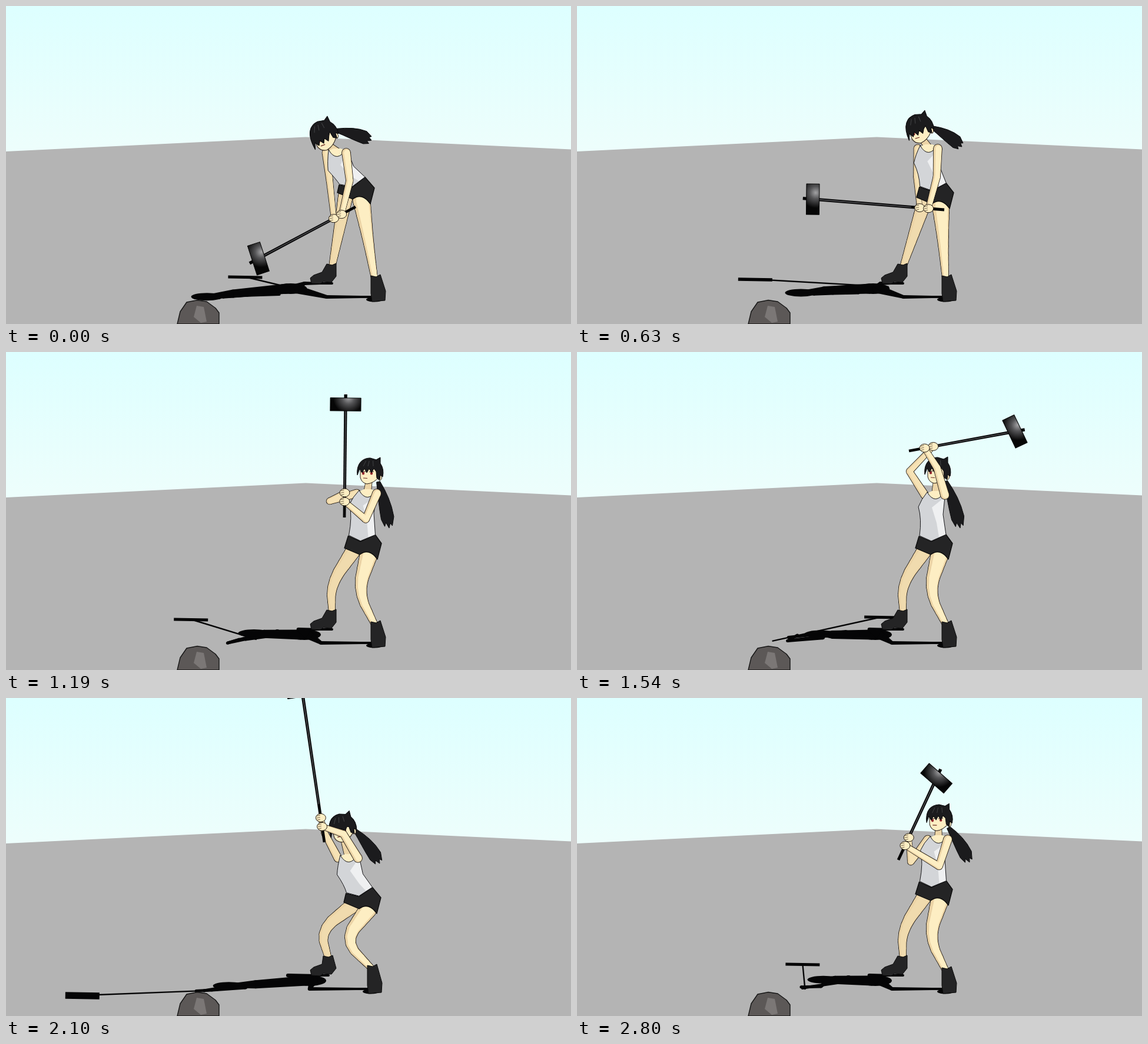
An HTML page with a canvas for the animation above (2.87 s loop, 960 by 540 pixels).

```html
<!DOCTYPE html>
<html lang="en">
<head>
<meta charset="utf-8">
<title>Hammer swing</title>
<style>
html, body { margin: 0; width: 100%; height: 100%; overflow: hidden; background: #b4b4b4; }
canvas { display: block; width: 960px; height: 540px; }
</style>
</head>
<body>
<canvas id="stage" width="960" height="540"></canvas>
<script>
const c = document.getElementById('stage').getContext('2d');
const LOOP = 2870, STEP = 70;
const SKIN = '#fdeec3', SHADE = '#ecd4a6', HAIR = '#1b1b1d', CLOTH = '#242425', BLACK = '#050506';

const smooth = u => u * u * (3 - 2 * u);
const strike = u => u < 2 / 3 ? 1.13 * (u * 1.5) ** 1.3 : 1.13 - 0.13 * smooth(u * 3 - 2);

// arms: upper-arm angles, near and far. hammer: angle, length, skew, depth of its shadow.
const ready = {
  t: 1190, ease: u => 1 - (1 - u) ** 2, hip: [609, 330], neck: [614, 235], head: [619, 203],
  tail: [651, 299], arms: [113, 164], butt: [575, 281], hammer: [-89.4, 192, 0, 454]
};
const poses = [
  { t: 0, ease: u => u * u, hip: [597, 314], neck: [562, 244], head: [540, 218],
    tail: [621, 228], arms: [83, 83], butt: [594, 341], hammer: [-208, 187, 10, 460] },
  { t: 630, ease: u => u, hip: [611, 322], neck: [597, 237], head: [582, 207],
    tail: [654, 239], arms: [92, 92], butt: [624, 346], hammer: [-175.4, 224, -4, 464] },
  ready,
  { ...ready, t: 1540, ease: u => u ** 2.2, neck: [609, 238], head: [613, 202],
    arms: [254, 237], butt: [564, 168], hammer: [-10.4, 183, -15, 450] },
  { t: 2100, ease: strike, hip: [608, 344], neck: [582, 267], head: [572, 220],
    tail: [635, 281], arms: [239, 242], butt: [541, 245], hammer: [-98.4, 261, 0, 505] },
  { t: 2520, ease: smooth, hip: [612, 345], neck: [555, 318], head: [522, 302],
    tail: [606, 311], arms: [104, 127], butt: [540, 432], hammer: [-173.2, 218, 0, 546] },
  { ...ready, t: 2800, head: [616, 204], tail: [667, 279],
    arms: [108, 127], butt: [546, 275], hammer: [-65, 153, 16, 452] }
];

const rad = deg => deg * Math.PI / 180;
const lerp = (a, b, u) => a.map((v, k) => v + (b[k] - v) * u);
const add = (p, x, y) => [p[0] + x, p[1] + y];
const polar = (p, a, r) => add(p, Math.cos(a) * r, Math.sin(a) * r);
const turn = (x, y, a) => [x * Math.cos(a) - y * Math.sin(a), x * Math.sin(a) + y * Math.cos(a)];

// Knee position for two bones, bending towards the left.
function bend(a, b, l1, l2) {
  const dx = b[0] - a[0], dy = b[1] - a[1], d = Math.hypot(dx, dy);
  if (d >= l1 + l2) return lerp(a, b, l1 / (l1 + l2));
  const along = (l1 * l1 - l2 * l2 + d * d) / (2 * d);
  const out = 1.15 * Math.sqrt(l1 * l1 - along * along);
  return add(a, (dx * along - dy * out) / d, (dy * along + dx * out) / d);
}

function skeleton(ms) {
  let i = poses.length - 2;
  while (ms < poses[i].t) i--;
  const from = poses[i], to = poses[i + 1];
  const u = from.ease((ms - from.t) / (to.t - from.t));
  const s = {};
  for (const k of ['hip', 'neck', 'head', 'tail', 'arms', 'butt', 'hammer']) s[k] = lerp(from[k], to[k], u);
  const { hip, neck, head } = s, grip = rad(s.hammer[0]);
  s.lean = Math.atan2(neck[0] - hip[0], hip[1] - neck[1]);
  s.bow = Math.max(0, Math.min(10, (neck[0] - head[0] + 4) * 0.4));
  const arm = (side, angle, reach) => {
    const shoulder = add(neck, side, 5);
    return [shoulder, polar(shoulder, rad(angle), 48), polar(s.butt, grip, reach)];
  };
  s.near = arm(16, s.arms[0], 27);
  s.far = arm(-18, s.arms[1], 42);
  const sink = Math.max(0, Math.min(1, (hip[1] - 330) / 14));
  const leg = (top, ankle, l1, l2) => [top, bend(top, ankle, l1, l2), ankle];
  s.nearLeg = leg(add(hip, 7, 15), [626 - 6 * sink, 462 - 4 * sink], 63, 61);
  s.farLeg = leg(add(hip, -20, 9), [554 - 6 * sink, 443], 66, 48);
  return s;
}

function trace(points) {
  const path = new Path2D();
  points.forEach(p => path.lineTo(...p));
  path.closePath();
  return path;
}

function paint(path, fill, stroke, w = 1) {
  c.fillStyle = fill;
  c.fill(path);
  if (!stroke) return;
  c.strokeStyle = stroke;
  c.lineWidth = w;
  c.stroke(path);
}

const poly = (points, ...style) => paint(trace(points), ...style);

function oval(x, y, rx, ry, ...style) {
  const path = new Path2D();
  path.ellipse(x, y, rx, ry, 0, 0, Math.PI * 2);
  paint(path, ...style);
}

function line(points, color, w) {
  c.beginPath();
  points.forEach(p => c.lineTo(...p));
  c.strokeStyle = color;
  c.lineWidth = w;
  c.stroke();
}

// Tapered chain through points of [x, y, width].
function chain(points, fill, scale = 1, grow = 0, dx = 0) {
  points.forEach(([x, y, w], i) => {
    const r = w / 2 * scale + grow;
    oval(x + dx, y, r, r, fill);
    if (!i) return;
    const [px, py, pw] = points[i - 1], q = pw / 2 * scale + grow;
    const a = Math.atan2(y - py, x - px) + Math.PI / 2;
    poly([polar([px + dx, py], a, q), polar([x + dx, y], a, r),
      polar([x + dx, y], a, -r), polar([px + dx, py], a, -q)], fill);
  });
}

const widen = (points, widths) => points.map((p, i) => [...p, widths[i]]);

// Corner cutting.
function soften(points) {
  const cut = points.slice(1).flatMap((p, i) => [lerp(points[i], p, 0.25), lerp(points[i], p, 0.75)]);
  return [points[0], ...cut, points[points.length - 1]];
}

function limb(points, dark, light) {
  chain(points, '#191511', 1, 0.8);
  chain(points, dark);
  if (light) chain(points, light, 0.72, 0, 1.3);
}

function scene() {
  const sky = c.createLinearGradient(0, 0, 0, 240);
  sky.addColorStop(0, '#ddffff');
  sky.addColorStop(1, '#edfefc');
  c.fillStyle = sky;
  c.fillRect(0, 0, 960, 540);
  poly([[0, 247], [509, 222.5], [960, 243.5], [960, 540], [0, 540]], '#b4b4b4');
}

function rock() {
  poly([[291, 540], [296, 519], [307, 503], [325, 499.5], [341, 502], [356, 513], [362, 521], [362, 540]],
    '#5c5857', '#161616', 1.4);
  poly([[324, 509], [336, 511], [341, 536], [331, 538], [319, 528]], '#7b7776');
}

// The light comes from the right: height turns into a shift to the left.
function drawShadow(s) {
  const cast = ([x, y], ground) => [x - 0.72 * (ground - y), ground];
  const body = p => cast(p, 480 + 0.24 * (s.hip[0] - p[0]));
  const [angle, len, , depth] = s.hammer;
  const tip = cast(polar(s.butt, rad(angle), len), depth);
  line([body(s.butt), tip], BLACK, 2.4);
  line([add(tip, -29, 0), add(tip, 29, 1)], BLACK, 5 + Math.max(0, depth - 460) * 0.15);
  for (const arm of [s.near, s.far]) chain(widen(arm.map(body), [8, 5, 5]), BLACK);
  const hip = body(s.hip), neck = body(s.neck), head = body(s.head);
  chain(widen([hip, neck, head], [17, 14, 7]), BLACK);
  oval(hip[0] + 6, hip[1], 28, 9, BLACK);
  oval(...head, 27, 6.5, BLACK);
  [[s.nearLeg, 494], [s.farLeg, 471]].forEach(([[, knee, ankle], ground]) =>
    chain(widen([add(hip, 12, 0), cast(knee, ground), cast(ankle, ground), [ankle[0], ground]], [15, 6, 4, 4]), BLACK));
  oval(s.nearLeg[2][0], 498.5, 14, 4, BLACK);
}

function farBoot([x, y]) {
  poly([[x - 9, y - 5], [x, y - 3], [x + 7, y - 6], [561, 459], [553, 469], [539, 468], [534, 472],
    [519, 471], [517, 462], [523, 457], [537, 452]], CLOTH, '#0b0b0b');
}

function nearBoot([x, y]) {
  poly([[x - 6, y - 4], [x + 3, y - 2], [x + 10, y - 6], [x + 19, 484], [x + 18, 500], [x - 4, 502],
    [x - 6, 488]], CLOTH, '#0b0b0b');
}

function drawTail({ head, bow, tail }) {
  const root = polar(head, rad(52 - bow * 7), 22);
  const mid = add(lerp(root, tail, 0.5), 3, -4);
  const side = Math.atan2(tail[1] - root[1], tail[0] - root[0]) + Math.PI / 2;
  const at = (u, o) => polar(lerp(lerp(root, mid, u), lerp(mid, tail, u), u), side, o);
  const swell = u => 3 + 8 * Math.sin(u * 2);
  const steps = [0, 0.2, 0.4, 0.6, 0.8];
  poly([...steps.map(u => at(u, swell(u))), at(0.95, 7), at(0.88, 4), at(1, 0), at(0.91, -3), at(0.97, -6),
    ...steps.reverse().map(u => at(u, -swell(u)))], HAIR, '#0a0a0b');
}

function drawShorts({ hip, lean }) {
  const waist = (x, y) => add(hip, ...turn(x, y, lean / 2));
  const rear = add(hip, 22, 22), crotch = add(hip, -8, 14), hem = add(hip, 8, 2);
  const path = new Path2D();
  [waist(-28, -17), waist(-7, -8), waist(18, -20), add(hip, 29, -5), rear].forEach(p => path.lineTo(...p));
  path.quadraticCurveTo(...hem, ...crotch);
  path.lineTo(...add(hip, -34, 3));
  path.closePath();
  paint(path, CLOTH, '#0a0a0a', 1.3);
}

function drawTorso({ hip, neck, head, lean, bow }) {
  const waist = (x, y) => add(hip, ...turn(x, y, lean / 2));
  const upper = (x, y) => add(neck, ...turn(x, y, lean));
  const left = add(neck, -14, 0), right = add(neck, 17, -2);
  limb([[...add(head, bow * 0.5 - 2, 15), 10], [...add(neck, 0, 3), 12]], SHADE);
  poly([add(left, -4, 4), add(neck, -6, -2), add(neck, 6, -2), add(right, 4, 4), add(neck, 6, 20)], SKIN);
  const back = upper(13, 38), low = waist(18, -20), chest = upper(-29, 25);
  const path = new Path2D();
  path.moveTo(...left);
  path.quadraticCurveTo(...add(neck, 0, 24), ...right);
  for (const p of [back, low, waist(-7, -9), waist(-27, -18)]) path.lineTo(...p);
  path.quadraticCurveTo(...upper(-23, 46), ...chest);
  path.quadraticCurveTo(...upper(-24, 12), ...left);
  c.save();
  paint(path, '#d3d5d8');
  c.clip(path);
  poly([add(right, -3, 12), add(right, 6, 6), add(back, 4, 0), add(low, 4, 0), waist(6, -16),
    upper(2, 52), upper(-6, 26)], '#eff0f1');
  c.restore();
  c.strokeStyle = '#17171a';
  c.lineWidth = 1;
  c.stroke(path);
}

function drawHead({ head, bow }) {
  c.save();
  c.translate(...head);
  c.rotate(-0.045 * bow);
  c.scale(1 + bow * 0.01, 1 + bow * 0.005);
  const face = new Path2D('M-17-6V10Q-15 19-6 21Q6 20 15 9V-6');
  c.save();
  c.translate(0, bow * 0.4);
  paint(face, SKIN, '#2a1f18');
  for (const x of [-12, 2]) {
    oval(x, 3, 2.2, 2.6, '#94262c');
    line([[x - 4, 0.5], [x + 4, 0]], '#2a1518', 1);
  }
  line([[-12, 11], [-5, 11.5]], '#6b2b22', 1.2);
  c.restore();
  oval(16, 10, 3.5, 5, SKIN, '#2a1f18');
  const hair = new Path2D('M17-14Q24-4 21 9L17 6L16 14L11 11L10 0');
  for (let k = 0; k < 7; k++) hair.lineTo(6 - 4 * k, (k % 2 ? 2 : -5) + bow * 1.1);
  hair.lineTo(-22, 6 + bow);
  hair.bezierCurveTo(-24, -14, -13, -23, 0, -23);
  hair.lineTo(10, -20);
  hair.lineTo(17, -24);
  hair.closePath();
  paint(hair, HAIR, '#08080a');
  for (const x of [-12, -4, 5]) line([[x, -9], [x * 0.7 + 1, -18]], '#414244', 1);
  c.restore();
}

function drawHammer({ butt, hammer: [angle, len, skew] }) {
  const size = 1 + Math.max(0, butt[1] - 346) / 260;  // larger when low, close to the viewer
  const long = 52 * size, wide = 22 * size, end = len + wide / 2 + 6, w = 2.7 * size;
  c.save();
  c.translate(...butt);
  c.rotate(rad(angle));
  poly([[0, -2.4], [end, -w], [end, w], [0, 2.4]], '#060607');
  line([[len * 0.25, 0], [len - wide / 2, 0]], '#4b4b4e', 1.6);
  c.translate(len, 0);
  c.rotate(rad(skew));
  const block = new Path2D();
  block.rect(-wide / 2, -long / 2, wide, long);
  const spot = turn(wide * 0.22, -wide * 0.5, -rad(angle + skew));
  const glow = c.createRadialGradient(...spot, 0, ...spot, long * 0.5);
  glow.addColorStop(0, '#a2a2a4');
  glow.addColorStop(0.4, '#555557');
  glow.addColorStop(1, '#060606');
  paint(block, glow, '#020202');
  c.restore();
}

function hand(x, y) {
  oval(x, y, 8.5, 7, SKIN, '#241b14');
  for (const k of [-3, 0.5, 4]) line([[x - 7, y + k], [x - 1, y + k - 1.5]], '#4b3a28', 0.8);
}

function draw(ms) {
  const s = skeleton(ms);
  scene();
  drawShadow(s);
  rock();
  limb(soften(soften(widen(s.farLeg, [24, 16, 10]))), SHADE, '#f0dbae');
  farBoot(s.farLeg[2]);
  drawTail(s);
  limb(widen(s.far, [13, 10.5, 8]), SHADE, '#f6e2b5');
  limb(soften(soften(widen(s.nearLeg, [29, 17, 10]))), SHADE, SKIN);
  nearBoot(s.nearLeg[2]);
  drawShorts(s);
  drawTorso(s);
  drawHead(s);
  limb(widen(s.near, [14, 11.5, 8.5]), SHADE, SKIN);
  drawHammer(s);
  hand(...s.far[2]);
  hand(...s.near[2]);
}

c.lineJoin = 'round';
const start = performance.now();
function tick(now) {
  const t = Math.max(0, now - start) % LOOP;
  draw(Math.floor(t / STEP) * STEP);
  requestAnimationFrame(tick);
}
draw(0);
requestAnimationFrame(tick);
</script>
</body>
</html>
```
